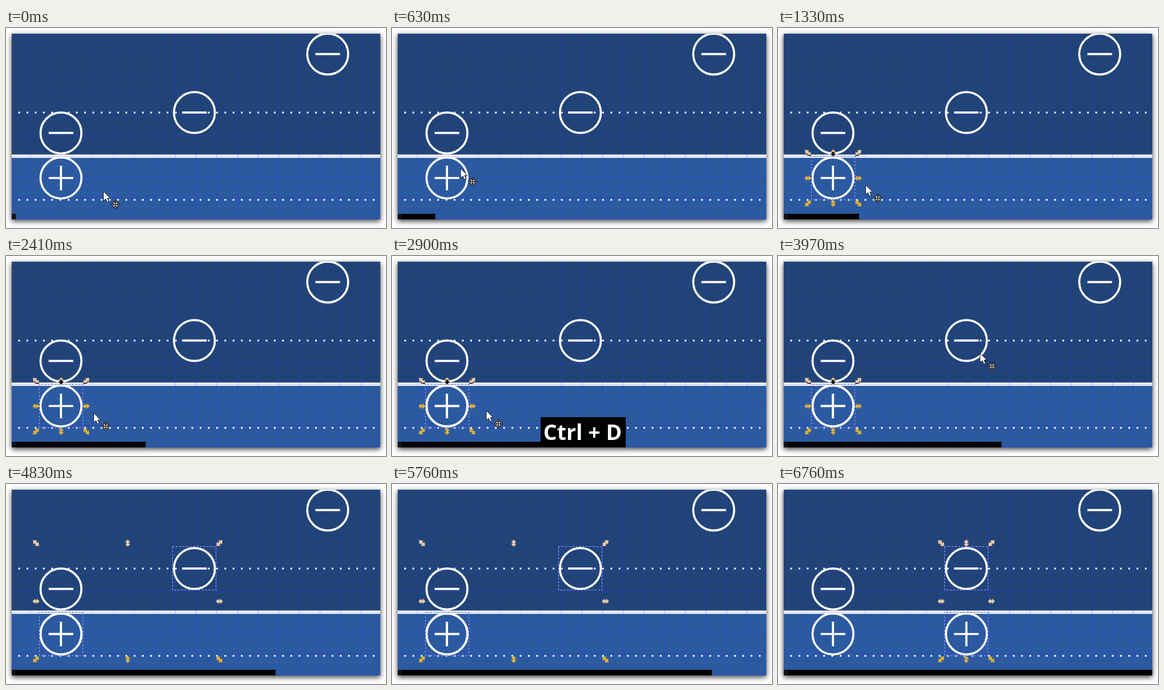
An HTML page that plays this animation: 665 px wide and 350 px high, repeating every 6.84 s.

```html
<!DOCTYPE html>
<html lang="en">
<head>
<meta charset="utf-8">
<style>
  html, body { margin: 0; width: 100%; height: 100%; overflow: hidden; background: #fff; }
  #stage { position: absolute; left: 10px; top: 10px; overflow: hidden; box-shadow: 0 3px 9px rgba(0, 0, 0, .78); }
  .ink { fill: none; stroke: #fff; stroke-width: 3.7; }
  text { font: bold 37.5px "Open Sans", "Noto Sans", sans-serif; fill: #fff; text-anchor: middle; }
</style>
</head>
<body>
<svg id="stage" width="645" height="325" viewBox="10 10 645 325">
  <defs>
    <!-- handles invert against what lies below them -->
    <linearGradient id="tint" gradientUnits="userSpaceOnUse" x1="0" y1="0" x2="0" y2="350">
      <stop offset=".634" stop-color="#efcaa5"/><stop offset=".634"/>
      <stop offset=".6486"/><stop offset=".6486" stop-color="#dcb037"/>
    </linearGradient>
    <linearGradient id="tintRing" gradientUnits="userSpaceOnUse" x1="0" y1="0" x2="0" y2="350">
      <stop offset=".619" stop-color="#e6bd70"/><stop offset=".619"/>
    </linearGradient>
  </defs>
  <rect x="10" y="10" width="645" height="325" fill="#214478"/>
  <rect x="10" y="224" width="645" height="111" fill="#2c5aa0"/>
  <rect x="10" y="221.5" width="645" height="5.7" fill="#fff"/>
  <g id="grid" stroke="#3333ff"></g>
  <g class="ink" style="stroke-width:3" stroke-dasharray="3 11.43">
    <path d="M21.5 148H650M21.5 300.7H650"/>
  </g>
  <g id="scene"></g>
  <rect x="10" y="325" height="10" id="bar"/>
  <rect x="10" y="325" width="7" height="10" fill="#10151d"/>
  <g id="label">
    <rect x="260" y="282" width="149" height="53"/>
    <text x="333.5" y="322">Ctrl + D</text>
  </g>
  <g id="cursor">
    <path d="M0 0V16.5L4 13L6.8 19L9.6 17.8L7 12H12Z" fill="#fff" stroke="#111" stroke-width=".9"/>
    <path d="M21 15.5L28.3 22.8L21 30.1L13.7 22.8Z" fill="#fff" stroke="#111" stroke-width="1.2"/>
    <path d="M21 18V27.6M16.2 22.8H25.8M19 20L21 18L23 20M19 25.6L21 27.6L23 25.6M18.2 20.8L16.2 22.8L18.2 24.8M23.8 20.8L25.8 22.8L23.8 24.8"
      fill="none" stroke="#111" stroke-width="1.3"/>
  </g>
</svg>
<script>
const LOOP = 6840, STEPS = 88;
const SELECT = 11, COPY = 33, HIDE_LABEL = 45, ADD = 53, EXIT = 62, ALIGN = 78;
const $ = id => document.getElementById(id);

function add(parent, tag, attrs = {}) {
  const el = document.createElementNS("http://www.w3.org/2000/svg", tag);
  for (const k in attrs) el.setAttribute(k, attrs[k]);
  return parent.appendChild(el);
}

for (let i = 0; i < 17; i++) {
  const x = Math.round(43 + i * 36.15) + .5;
  add($("grid"), "path", { d: `M${x} 10V335`, opacity: i < 7 ? .14 : .33 });
}
for (let i = 0; i < 9; i++) {
  const y = Math.round(43 + i * 36.2) + .5;
  add($("grid"), "path", { d: `M10 ${y}H655`, opacity: i < 3 ? .14 : .36 });
}

function charge(x, y, plus) {
  const g = add($("scene"), "g", { class: "ink" });
  add(g, "circle", { cx: x, cy: y, r: 35.8 });
  add(g, "path", { d: `M${x - 21.5} ${y}h43` + (plus ? `M${x} ${y - 21.5}v43` : "") });
  return g;
}

const ARROW = [[0, -1], [1, -.2], [.4, -.2], [.4, .2], [1, .2], [0, 1], [-1, .2], [-.4, .2], [-.4, -.2], [-1, -.2]];

function handle(g, x, y, angle, ring) {
  const c = Math.cos(angle), s = Math.sin(angle), len = angle % (Math.PI / 2) ? 7.6 : 6.3;
  const points = ARROW.map(([a, b]) => {
    const u = a * 4.8, v = b * len;
    return [x + u * c - v * s, y + u * s + v * c].map(n => n.toFixed(2));
  });
  add(g, "polygon", { points: points.join(" "), fill: ring ? "url(#tintRing)" : "url(#tint)" });
}

// boxes: top-left corners of the selected 76px circles
function selection(boxes) {
  const g = add($("scene"), "g");
  for (const [x, y] of boxes) {
    const box = { x, y, width: 76, height: 76, fill: "none" };
    add(g, "rect", { ...box, stroke: "#2b3bd0" });
    add(g, "rect", { ...box, stroke: "#aab6ee", "stroke-dasharray": "3 3" });
  }
  const xs = boxes.map(b => b[0]), ys = boxes.map(b => b[1]);
  const l = Math.min(...xs) - 6, r = Math.max(...xs) + 82;
  const t = Math.min(...ys) - 6, b = Math.max(...ys) + 82.5;
  const mx = (l + r) / 2, my = (t + b) / 2, q = Math.PI / 4;
  handle(g, l, t, -q); handle(g, r, t, q);
  handle(g, l, b, q); handle(g, r, b, -q);
  handle(g, mx, t, 0, boxes.length === 1); handle(g, mx, b, 0);
  handle(g, l, my, 2 * q); handle(g, r, my, 2 * q);
  return g;
}

charge(96.2, 183.7);
charge(329.7, 147.9);
charge(563, 45.6);
charge(96.2, 262.5, true);
const copy = charge(96.2, 262.5, true);
const aligned = charge(329.7, 262.5, true);
const LOW = [58.5, 224.5], MID = [291.5, 109.5];
const single = selection([LOW]);
const pair = selection([MID, LOW]);
const column = selection([MID, [291.5, 224.5]]);

// cursor tip: step, x, y
const PATH = [
  [0, 170.5, 286], [8, 120, 246], [11, 120, 246], [16, 153.5, 275], [36, 153.5, 275],
  [43, 362.5, 200], [45, 360, 183], [48, 353.5, 170], [55, 353.5, 170], [62, 524, 340]
];

function tip(n) {
  const i = Math.max(1, PATH.findIndex(p => p[0] >= n));
  const [n0, x0, y0] = PATH[i - 1], [n1, x1, y1] = PATH[i];
  const u = (n - n0) / (n1 - n0), e = u * u * (3 - 2 * u);
  return [x0 + (x1 - x0) * e, y0 + (y1 - y0) * e];
}

const show = (el, on) => { el.style.display = on ? "" : "none"; };

function draw() {
  const t = performance.now() % LOOP;
  const n = Math.min(STEPS - 1, Math.floor((t + 8) * STEPS / LOOP));
  $("bar").setAttribute("width", 645 * (n + 1) / STEPS);
  show(single, n >= SELECT && n < ADD);
  show(pair, n >= ADD && n < ALIGN);
  show(column, n >= ALIGN);
  show(copy, n >= COPY && n < ALIGN);
  show(aligned, n >= ALIGN);
  show($("label"), n >= COPY && n < HIDE_LABEL);
  show($("cursor"), n < EXIT);
  if (n < EXIT) $("cursor").setAttribute("transform", `translate(${tip(n)})`);
  requestAnimationFrame(draw);
}
draw();
</script>
</body>
</html>
```
